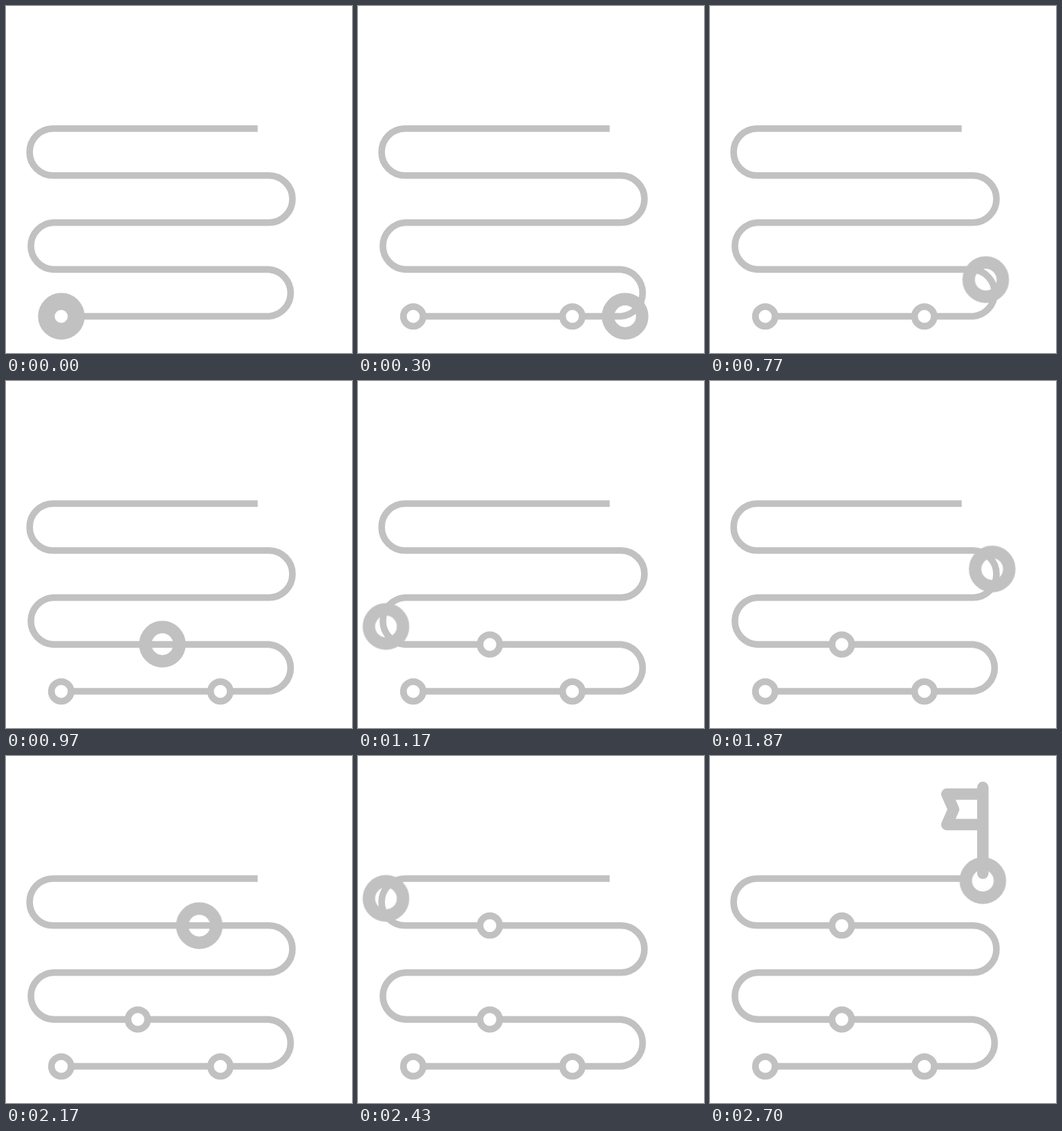
An HTML page for the animation above (2.73 s loop, 500 by 501 pixels).

```html
<!DOCTYPE html>
<html lang="en">
<head>
<meta charset="utf-8">
<title>Winding route</title>
<style>
  html, body { margin: 0; width: 100%; height: 100%; overflow: hidden; background: #fff; }
  svg { display: block; width: 100%; height: 100%; }

  .line { fill: none; stroke: #c1c1c1; stroke-width: 9.6; }
  .stop { fill: #fff; stroke: #c1c1c1; stroke-width: 9.6; }
  .ring { fill: none; stroke: #c1c1c1; stroke-width: 18; }
  .flag { fill: none; stroke: #c1c1c1; stroke-width: 16.5; stroke-linecap: round; stroke-linejoin: round; }

  /* 82 ticks per loop; the small delay lines the ticks up with 10 ms time stamps */
  .ring, .late { animation: 2730ms step-end -3.5ms infinite; }
  .ring { animation-name: travel; }
  .second { animation-name: show-second; }
  .third { animation-name: show-third; }
  .fourth { animation-name: show-fourth; }
  .flag { animation-name: show-flag; }

  @keyframes travel {
    0%      { transform: translate(80px, 448px);  animation-timing-function: steps(9); }
    10.976% { transform: translate(386px, 448px); animation-timing-function: steps(4); }
    15.854% { transform: translate(386px, 448px); animation-timing-function: steps(5); }
    21.951% { transform: translate(414px, 414px); animation-timing-function: steps(9); }
    32.927% { transform: translate(386px, 380px); animation-timing-function: steps(4); }
    37.805% { transform: translate(66px, 380px);  animation-timing-function: steps(5); }
    43.902% { transform: translate(34px, 348px);  animation-timing-function: steps(9); }
    54.878% { transform: translate(66px, 313px);  animation-timing-function: steps(4); }
    59.756% { transform: translate(386px, 313px); animation-timing-function: steps(5); }
    65.854% { transform: translate(414px, 279px); animation-timing-function: steps(9); }
    76.829% { transform: translate(386px, 245px); animation-timing-function: steps(6); }
    84.146% { transform: translate(66px, 245px);  animation-timing-function: steps(3); }
    87.805% { transform: translate(34px, 212px);  animation-timing-function: steps(5); }
    93.902% { transform: translate(66px, 180px);  animation-timing-function: steps(4); }
    98.78%, 100% { transform: translate(394.3px, 180px); }
  }
  @keyframes show-second { 0% { opacity: 0; } 8.537%, 100% { opacity: 1; } }
  @keyframes show-third  { 0% { opacity: 0; } 36.585%, 100% { opacity: 1; } }
  @keyframes show-fourth { 0% { opacity: 0; } 81.707%, 100% { opacity: 1; } }
  @keyframes show-flag   { 0% { opacity: 0; } 98.78%, 100% { opacity: 1; } }
</style>
</head>
<body>
<svg viewBox="0 0 500 501" preserveAspectRatio="none">
  <path class="line" d="M80 448H380A33.9 33.9 0 0 0 380 380.4H68A33.9 33.9 0 0 1 68 312.7H380A33.9 33.9 0 0 0 380 244.8H68A33.9 33.9 0 0 1 68 177H363.7"/>
  <circle class="stop" cx="79.8" cy="448.2" r="14.2"/>
  <circle class="stop late second" cx="309.8" cy="448.2" r="14.2"/>
  <circle class="stop late third" cx="190.5" cy="380.4" r="14.2"/>
  <circle class="stop late fourth" cx="190.5" cy="244.8" r="14.2"/>
  <circle class="ring" r="24.7"/>
  <path class="flag late" d="M394.3 45.3V169.3M394.3 55H342.3L352 77L342.3 99H394.3"/>
</svg>
</body>
</html>
```
